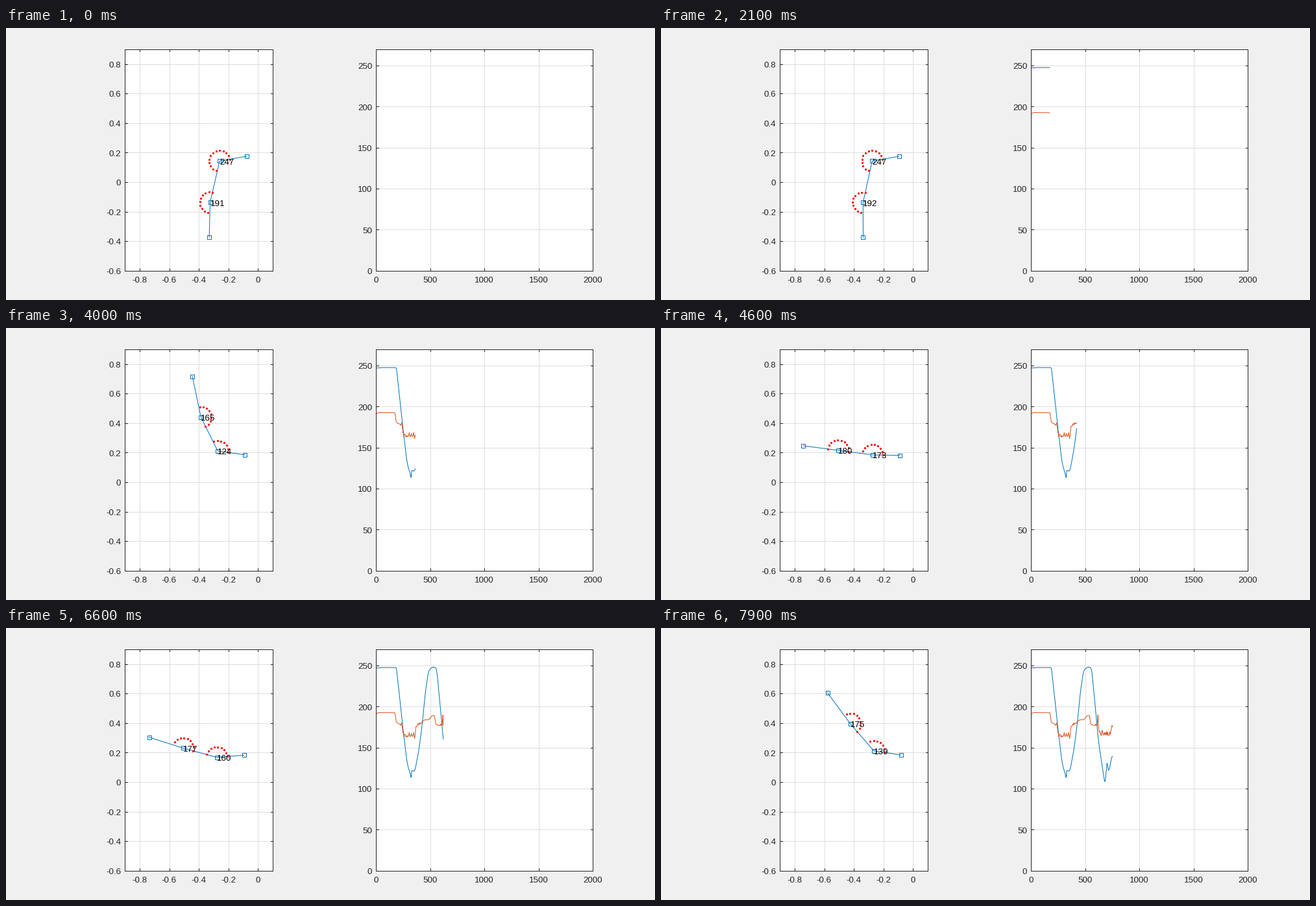
These frames come from a looping animation (1000x420 px, 8000 ms). A matplotlib script:

```python
import matplotlib.pyplot as plt
import numpy as np
from matplotlib.animation import FuncAnimation

W, H, DPI = 1000, 420, 100
PX = 72 / DPI                      # one pixel in points
BLUE, ORANGE, INK, GRID = "#0072BD", "#D95319", "#262626", "#DEDEDE"
FRAMES, INTERVAL, HOLD = 80, 100, 4
SAMPLES_PER_FRAME = 10
ARC_RADIUS, ARC_STEP = 16, 20

plt.rcParams["font.family"] = "Liberation Sans"
plt.rcParams["font.size"] = 13.33 * PX


def smooth(x, *keys):
    """Pass through (x, y) keys without overshooting them."""
    kx, ky = np.array(keys, float).T
    step = np.diff(kx)
    rise = np.diff(ky) / step
    slope = np.zeros_like(ky)
    a, b = rise[:-1], rise[1:]
    keep = a * b > 0
    slope[1:-1][keep] = (2 * a * b)[keep] / (a + b)[keep]
    i = np.clip(np.searchsorted(kx, x, side="right") - 1, 0, len(step) - 1)
    t = (x - kx[i]) / step[i]
    ease = t * t * (3 - 2 * t)
    bend = t * (1 - t) * ((1 - t) * slope[i] - t * slope[i + 1])
    return ky[i] + (ky[i + 1] - ky[i]) * ease + step[i] * bend


samples = np.arange(1, (FRAMES - HOLD - 1) * SAMPLES_PER_FRAME + 2)

# Two swings of the upper joint, each with a small rebound at its lowest angle.
upper = smooth(samples, (1, 247.1), (55, 247.7), (183, 247.6), (205, 226),
               (247, 175), (291, 129.4), (318, 117), (323, 113.8), (330, 122),
               (350, 121.5), (382, 138), (421, 173.4), (461, 223),
               (491, 244.5), (530, 248.2), (552, 247), (585, 210),
               (621, 160.3), (661, 124), (682, 108.7), (702, 131),
               (715, 122.5), (751, 139.4))

lower = smooth(samples, (1, 191.4), (25, 192.8), (172, 192.6), (188, 181),
               (240, 177), (249, 168.5), (291, 164.4), (360, 165), (368, 175),
               (421, 180.2), (450, 184), (485, 184), (511, 188.3),
               (535, 189.3), (555, 178), (609, 177), (617, 191), (621, 177.5),
               (630, 169), (725, 165), (751, 175.6))

# The lower joint trembles while the limb is raised.
spikes = np.random.default_rng(4).uniform(-4.5, 4.5, len(samples) // 5 + 1)
spikes[::2] = 0
tremor = np.interp(samples, samples[::5], spikes)
lower += tremor * np.clip((215 - upper) / 40, 0, 1)

tip_x = smooth(samples, (1, 370.5), (171, 366.7), (421, 368), (511, 365.5),
               (621, 366.5), (751, 369.5))
tilt = smooth(samples, (1, 10), (183, 10), (291, -7), (323, -9), (361, -8),
              (421, -1), (511, 11.3), (545, 11), (621, 4.4), (681, -9.5),
              (751, -8.6))

fig = plt.figure(figsize=(W / DPI, H / DPI), dpi=DPI, facecolor="#F0F0F0")
ax = fig.add_axes([0, 0, 1, 1])
ax.set(xlim=(0, W), ylim=(H, 0))
ax.axis("off")


def line(x, y, color, z):
    return ax.plot(x, y, color=color, lw=PX, zorder=z)[0]


def draw_panel(left, right, xlim, ylim, xticks, yticks):
    """Draw a boxed grid and return its data-to-pixel mapping."""
    top, bottom, tick = 32.8, 374.8, 3.5

    def to_px(x, y):
        return (left + (x - xlim[0]) * (right - left) / (xlim[1] - xlim[0]),
                bottom - (y - ylim[0]) * (bottom - top) / (ylim[1] - ylim[0]))

    ax.fill([left, right, right, left], [top, top, bottom, bottom],
            color="white", lw=0, zorder=0)
    for v in xticks:
        x = to_px(v, 0)[0]
        line([x, x], [top, bottom], GRID, 1)
        line([x, x], [bottom, bottom - tick], INK, 4)
        line([x, x], [top, top + tick], INK, 4)
        ax.text(x - 0.3, 393, f"{v:g}", color=INK, ha="center",
                va="baseline")
    for v in yticks:
        y = to_px(0, v)[1]
        line([left, right], [y, y], GRID, 1)
        line([left, left + tick], [y, y], INK, 4)
        line([right, right - tick], [y, y], INK, 4)
        ax.text(left - 6, y + 5.2, f"{v:g}", color=INK, ha="right",
                va="baseline")
    line([left, right, right, left, left], [top, top, bottom, bottom, top],
         INK, 4)
    return to_px


draw_panel(183.2, 411.2, (-0.9, 0.1), (-0.6, 0.9),
           np.arange(-4, 1) / 5, np.arange(-3, 5) / 5)
chart = draw_panel(570.2, 904.2, (0, 2000), (0, 270),
                   range(0, 2001, 500), range(0, 251, 50))

curve_x, upper_y = chart(samples, upper)
lower_y = chart(samples, lower)[1]
upper_curve = line([], [], BLUE, 3)
lower_curve = line([], [], ORANGE, 3)

limb, = ax.plot([], [], color=BLUE, lw=PX, marker="s", ms=6 * PX, mfc="none",
                mec=BLUE, mew=PX, zorder=5)
dots, = ax.plot([], [], "o", color="red", ms=3.2 * PX, mew=0, zorder=6)
labels = [ax.text(0, 0, "", color="black", ha="left", va="baseline", zorder=7)
          for _ in range(2)]


def polar(origin, length, degrees):
    a = np.radians(degrees)
    return np.array([origin[0] + length * np.cos(a),
                     origin[1] - length * np.sin(a)])


def update(frame):
    n = 1 + SAMPLES_PER_FRAME * max(0, frame - HOLD)
    up, low, lean = upper[n - 1], lower[n - 1], tilt[n - 1]

    # Seen from the side, the segments seem to stretch as the limb swings.
    middle = 53.5 + 0.0021 * (up - 172) ** 2
    end = 54 + 0.004 * max(0, 175 - up) ** 2

    tip = np.array([tip_x[n - 1], 193.3 + 0.0195 * up])
    joint = polar(tip, 42, lean + 180)
    elbow = polar(joint, middle, lean + up)
    back = lean + up - 180
    hand = polar(elbow, end, back + low)
    limb.set_data(*np.array([tip, joint, elbow, hand]).T)

    arcs = [polar(p, ARC_RADIUS, start + np.arange(0, sweep, ARC_STEP))
            for p, start, sweep in ((joint, lean, up), (elbow, back, low))]
    dots.set_data(*np.hstack(arcs))

    for label, p, angle in zip(labels, (joint, elbow), (up, low)):
        label.set_position((p[0], p[1] + 5.5))
        label.set_text(str(int(angle)))

    upper_curve.set_data(curve_x[:n], upper_y[:n])
    lower_curve.set_data(curve_x[:n], lower_y[:n])
    return [limb, dots, upper_curve, lower_curve, *labels]


anim = FuncAnimation(fig, update, frames=FRAMES, interval=INTERVAL,
                     repeat=True, repeat_delay=0)
plt.show()
```
